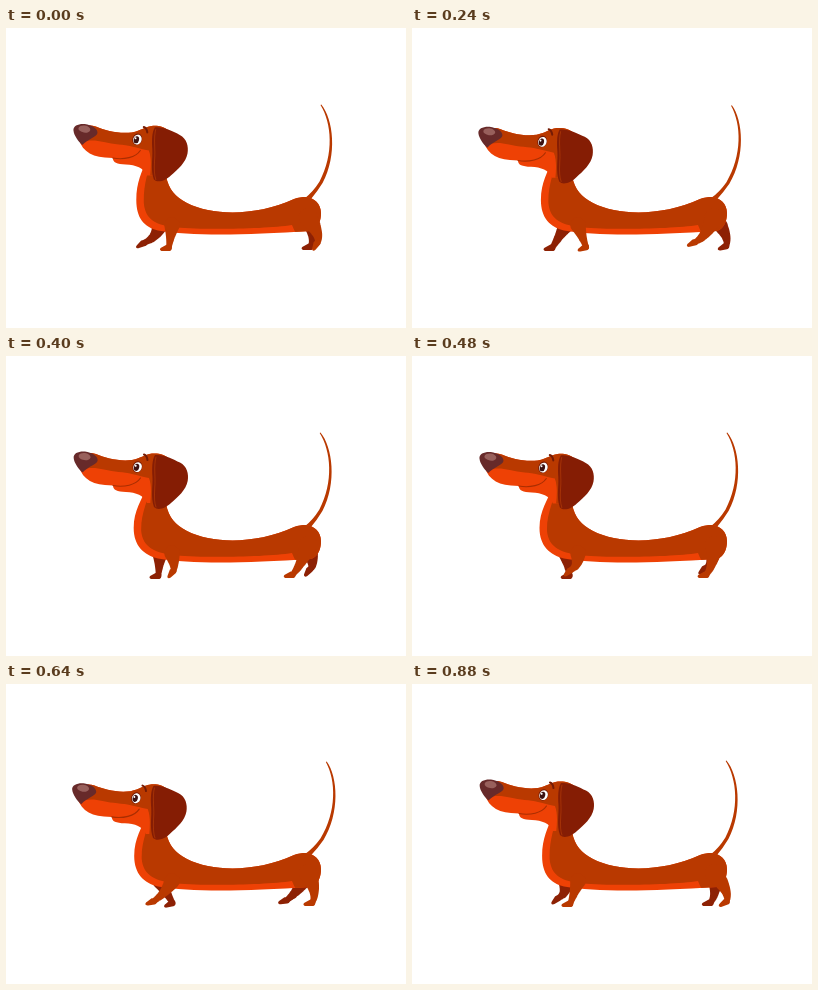
These frames come from a looping animation (400x300 px, 0.96 s). An HTML page with a canvas:

```html
<!DOCTYPE html>
<html lang="en">
<head>
<meta charset="utf-8">
<title>Walking dachshund</title>
<style>
html, body { margin: 0; width: 100%; height: 100%; overflow: hidden; background: #fff; }
canvas { display: block; width: 400px; height: 300px; }
</style>
</head>
<body>
<canvas id="stage" width="400" height="300"></canvas>
<script>
const g = document.getElementById('stage').getContext('2d');
const LOOP = 960, STEP = 40, TAU = Math.PI * 2;
const BROWN = '#b93900', BRIGHT = '#ee4105', DARK = '#851d04', FAR = '#8d2104';

// Gait: start is the touchdown time, stance the share of the loop on the ground.
const FORE = { hipY: 197, ground: 219.5, lift: 4, stance: .6, ease: .35, reach: .5, back: 0, bend: 4, thick: 5 };
const HIND = { hipY: 189, ground: 218.5, lift: 5, stance: .62, ease: 1, reach: .8, back: 6, bend: 0, thick: 6.5 };
const foreNear = { ...FORE, hipX: 166, front: 147, stride: 30, start: 704, color: BROWN };
const foreFar = { ...FORE, hipX: 154, front: 132, stride: 38, start: 140, color: FAR };
const hindNear = { ...HIND, hipX: 302, front: 280, stride: 35, start: 340, color: BROWN };
const hindFar = { ...HIND, hipX: 302, front: 280, stride: 35, start: 690, color: FAR };

const TAIL = new Path2D('M315,76.5 C327,91 331.5,127 316.5,155 Q311,164 305,171 L298,171 Q307,164 313.5,153.5 C328,126 325.5,95 314.2,77Z');
const HEAD = new Path2D('M72,106 C74,120 83,128 99,129 L107,129.5 C107,134 111,135.5 120,136 C130,136.5 138,139.5 141,147 L162,147 L165,105 C160,98 152,97 146,97.5 C138,98.5 136,102 126,104 C112,105.5 100,102 90,98 C82,95 73,98 72,106Z');
const CROWN = new Path2D('M76,114 C82,111 90,111.5 98,113.5 C108,116 118,116 126,118 C132,119.5 138,121 143,122 C146,130 145,140 144,150 L170,150 L170,90 L70,90Z');
const MOUTH = new Path2D('M107,129.5 C118,131.5 130,129 134.5,122');
const NOSE = new Path2D('M67.7,102 C67.2,97 73,95 79,95.5 C86,96.5 92,100 91.7,104.5 C91,108.5 82,110.5 76.5,116.5 C72.5,113 68.2,107 67.7,102Z');
const EAR = new Path2D('M149,99 C157,98 167,103 174,106.5 C181,110 183,118 181.7,125 C180,134 172,141 165,147 C160,152 152,155 148,151 C144.5,141 147,131 146.5,121 C146,112 146,104 149,99Z');
const EAR_RIM = new Path2D('M150,101 C147.5,109 149.5,119 149,128 C148.5,137 147.5,145 150,151');
const BROW = new Path2D('M138,98.5 Q141,99.5 141.5,104');

function fill(path, color) {
  g.fillStyle = color;
  g.fill(path);
}

function line(path, color, width) {
  g.strokeStyle = color;
  g.lineWidth = width;
  g.stroke(path);
}

function oval(x, y, rx, ry, tilt, color) {
  g.fillStyle = color;
  g.beginPath();
  g.ellipse(x, y, rx, ry, tilt, 0, TAU);
  g.fill();
}

function clipped(shape, inner, color) {
  g.save();
  g.clip(shape);
  fill(inner, color);
  g.restore();
}

function turn(x, y, angle) {
  g.translate(x, y);
  g.rotate(angle);
  g.translate(-x, -y);
}

// How far back the ankle is, how high it is lifted (both 0 to 1) and the paw tilt.
function gait(l, t) {
  const p = (t - l.start + LOOP) % LOOP / LOOP / l.stance;
  if (p < 1) return { back: p * (1 + l.ease - l.ease * p), up: 0, tilt: -.9 * p ** 10 };
  const q = (p - 1) * l.stance / (1 - l.stance);
  return { back: 1 - Math.sin(q * Math.PI / 2), up: Math.sin(q * Math.PI), tilt: -.9 * (1 - q) };
}

function leg(l, t) {
  const { back, up, tilt } = gait(l, t);
  const fx = l.front + l.stride * back;
  const fy = l.ground - l.lift * up + 3.5 * tilt;
  const kx = l.hipX + (fx - l.hipX) * l.reach + l.back + l.bend * up;
  const ky = 208 + 3 * up;
  g.fillStyle = l.color;
  g.beginPath();
  for (let i = 0; i <= 30; i++) {
    const s = i / 30, q = 1 - s;
    const x = q * q * l.hipX + 2 * q * s * kx + s * s * fx;
    const y = q * q * l.hipY + 2 * q * s * ky + s * s * fy;
    const r = 2.8 + l.thick * q ** 1.5;
    g.moveTo(x + r, y);
    g.arc(x, y, r, 0, TAU);
  }
  g.fill();
  g.save();
  g.translate(fx, fy);
  g.rotate(tilt);
  fill(new Path2D('M2.8,-1.5 C3.2,2 2.5,3.4 0,3.5 L-6.5,3.5 C-9.5,3.4 -9.8,.8 -7,-.3 L-2,-3Z'), l.color);
  g.restore();
}

function body(c) {
  const shape = new Path2D(`M141,130 C136,144 ${c},154 ${c},172 C${c},190 138,199 152,202.5 C185,208 235,207.5 305,203 C313,200 315,192 315,185 C315,176 308,169.5 300,169 C296,169 292,169.5 288,171 C250,188.3 207,188 181,175 C169,168.5 163,162 160,148 L158,125Z`);
  const back = new Path2D(`M146,125 C142,146 ${c + 7},156 ${c + 7.5},175 C${c + 9},192 150,197 170,199.5 C200,202 260,201 286,197 Q288,203 292,208 L325,208 L325,160 L150,120Z`);
  fill(shape, BRIGHT);
  clipped(shape, back, BROWN);
}

function head(u) {
  g.save();
  g.translate(-u, 3 * u);
  turn(150, 150, -.011 * u);
  fill(HEAD, BRIGHT);
  clipped(HEAD, CROWN, BROWN);
  line(MOUTH, '#a92e02', 1.1);
  fill(NOSE, '#672a2a');
  oval(78.6, 100.5, 6, 3.5, .15, '#98605c');
  oval(131.4, 110.8, 4.8, 5.8, .35, '#741b05');
  oval(131.6, 111.1, 4.2, 5, .35, '#fff');
  oval(130.6, 111.3, 2.6, 3.6, .25, '#3c1212');
  oval(129.8, 109.8, .9, 1.1, 0, '#fff');
  line(BROW, '#741b05', 2);
  fill(EAR, DARK);
  line(EAR_RIM, '#a43207', 1);
  g.restore();
}

function draw(t) {
  const u = (1 + Math.cos(TAU * (t - 180) / 480)) / 2;
  const chest = 128.9 + 1.4 * Math.cos(TAU * t / LOOP);
  g.clearRect(0, 0, 400, 300);

  g.save();
  turn(301, 172, .068 * (u - .1));
  fill(TAIL, BROWN);
  g.restore();

  leg(hindFar, t);
  leg(foreFar, t);
  body(chest);
  leg(hindNear, t);
  leg(foreNear, t);
  head(u);
}

g.lineCap = 'round';
const start = performance.now();
function tick() {
  const t = (performance.now() - start) % LOOP;
  draw(Math.min(Math.floor(t / STEP), 22) * STEP);
  requestAnimationFrame(tick);
}
tick();
</script>
</body>
</html>
```
